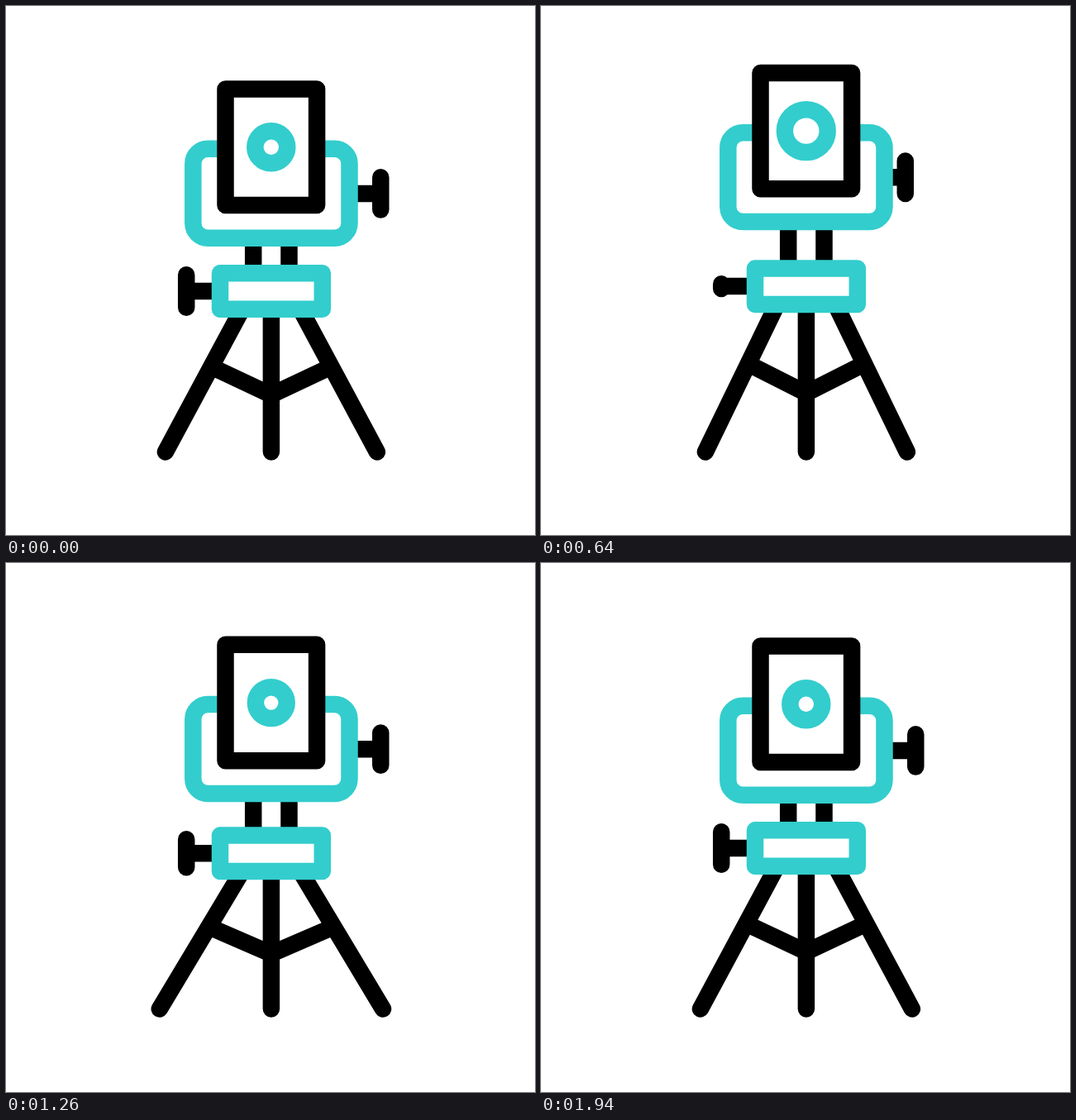
Recreate the animation shown at these times as an HTML page. Size 640 by 640 pixels, loop 2.4 s.

```html
<!DOCTYPE html>
<html lang="en">
<head>
<meta charset="utf-8">
<title>Camera on a tripod</title>
<style>
  html, body { margin: 0; height: 100%; overflow: hidden; background: #fff; }
  svg { display: block; width: 100vw; height: 100vh; }
  svg * { stroke-width: 20.5; stroke-linecap: round; stroke-linejoin: round; }
  .black { stroke: #000; fill: none; }
  .cyan { stroke: #33cdcd; fill: #fff; }
  .panel { fill: #fff; }
  .flat { stroke-linecap: butt; }
</style>
</head>
<body>
<svg viewBox="0 0 640 640">
  <path id="legs" class="black"/>
  <path id="posts" class="black flat"/>
  <path id="clamp" class="black"/>
  <rect id="base" class="cyan" x="259" y="323.3" width="123.8" height="43.5"/>
  <g id="head">
    <path id="knob" class="black"/>
    <rect class="cyan" x="226.3" y="172.8" width="189.2" height="107.9" rx="18"/>
    <rect class="black panel" x="265.5" y="100.6" width="110.6" height="140.4"/>
    <circle id="lens" class="cyan" cx="320.8" cy="170.8"/>
  </g>
</svg>
<script>
  const LOOP = 2400;
  const MID = 320.9, FLOOR = 539.5, HIP = 35.4, BRACE = 0.402;
  const set = (id, name, value) => document.getElementById(id).setAttribute(name, value);
  const mix = (a, b, x) => a + (b - a) * x;

  function ease(t, from, to) {
    const x = Math.min(1, Math.max(0, (t - from) / (to - from)));
    return x * x * (3 - 2 * x);
  }

  function render(t) {
    // Rises from 0 to 1 between a and b, falls back between c and d.
    const pulse = (a, b, c, d) => ease(t, a, b) - ease(t, c, d);

    // Tripod: squash, stretch, squash, small bounce. Positive is down.
    const squash = pulse(200, 385, 385, 875) + pulse(1050, 1340, 1380, 1610);
    const stretch = pulse(385, 875, 1050, 1340);
    const base = 12.5 * squash - 22 * stretch - 8.5 * pulse(1380, 1610, 1610, 1900);
    const head = 4.8 * pulse(960, 1380, 1380, 1615)
      - 28.8 * pulse(310, 840, 960, 1380) - 9.3 * pulse(1380, 1615, 1615, 1880);

    const knob = 453.3 - 12.5 * pulse(200, 600, 700, 1080);
    const clamp = 19.7 - 9.7 * pulse(200, 500, 1080, 1360) - 10 * pulse(200, 500, 500, 900);
    const lens = 19.5 + 7.5 * pulse(200, 780, 780, 1070) - 2.2 * pulse(780, 1070, 1070, 1360);

    // The legs spread as the base sinks; the brace keeps its place along them.
    const foot = 128 + 1.08 * base + 0.011 * base * base;
    const top = 367 + base;
    const braceX = mix(HIP, foot, BRACE), braceY = mix(top, FLOOR, BRACE);
    const leg = side => `M${MID + side * foot} ${FLOOR}L${MID + side * HIP} ${top}` +
      `M${MID + side * braceX} ${braceY}L${MID} ${470.5 + 0.36 * base}`;
    const post = x => `M${x} ${280 + head}V${323 + base}`;

    set('legs', 'd', leg(-1) + leg(1) + `M${MID} ${FLOOR}V${top}`);
    set('posts', 'd', post(299.2) + post(342.5));
    set('clamp', 'd', `M218.2 ${345 + base - clamp}v${2 * clamp}M218.2 ${345 + base}H259`);
    set('knob', 'd', `M${knob} 207.2v39.4M${knob} 226.9H415`);
    set('base', 'transform', `translate(0 ${base})`);
    set('head', 'transform', `translate(0 ${head})`);
    set('lens', 'r', lens);
  }

  const start = performance.now();
  function tick() {
    render((performance.now() - start) % LOOP);
    requestAnimationFrame(tick);
  }
  tick();
</script>
</body>
</html>
```
